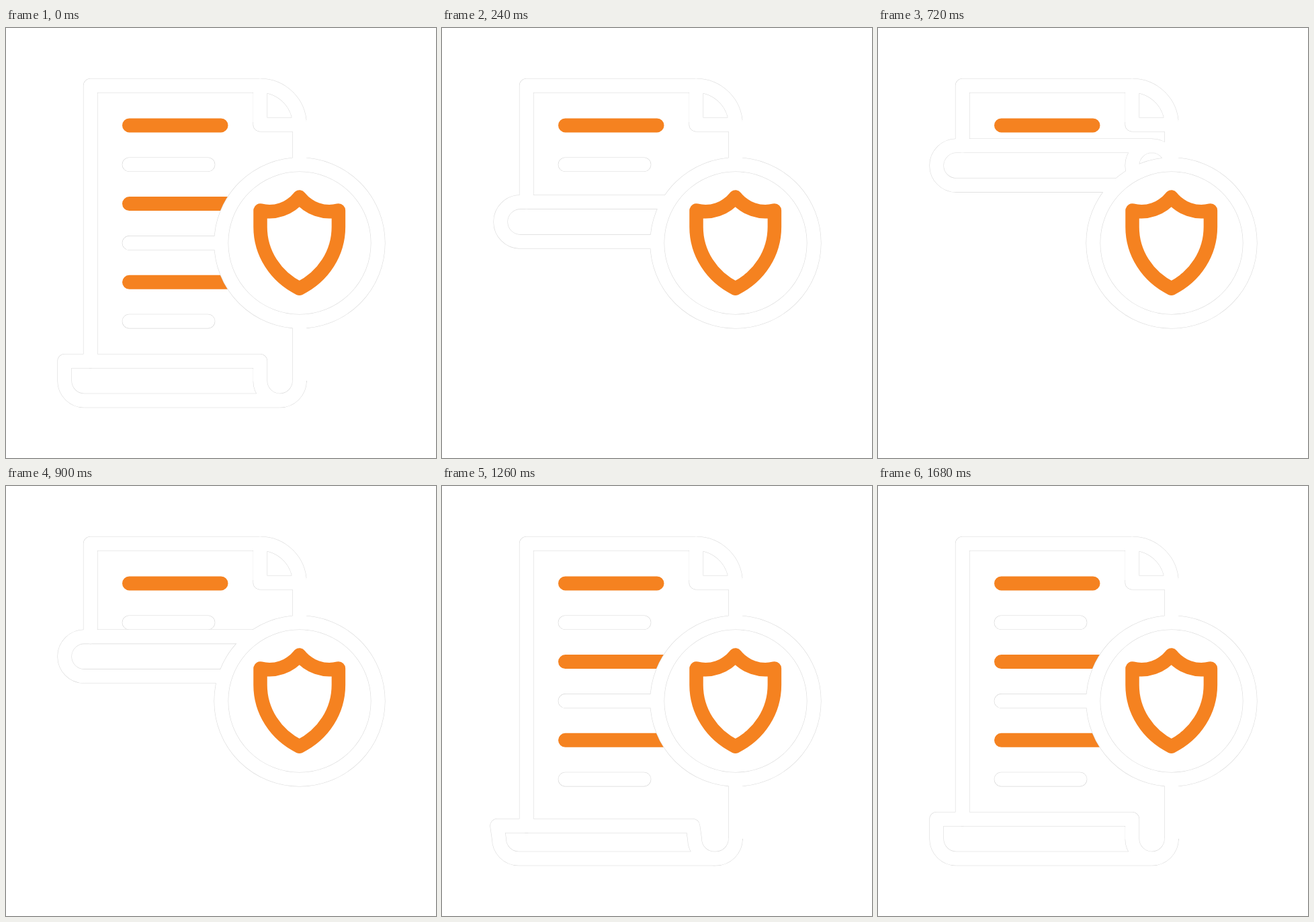
An HTML page that plays this animation: 640 px wide and 640 px high, repeating every 1.71 s.

```html
<!DOCTYPE html>
<html lang="en">
<head>
<meta charset="utf-8">
<title>Protected scroll</title>
<style>
  html, body { margin: 0; width: 100%; height: 100%; overflow: hidden; background: #fff; }
  svg { display: block; width: 100vw; height: 100vh; }
  path, circle { fill: none; stroke-linecap: round; stroke-linejoin: round; }
  .edge { stroke: #d8d8d8; stroke-width: 21.6; }
  .white { stroke: #fff; stroke-width: 20.5; }
  .orange { stroke: #f58220; stroke-width: 21; }
</style>
</head>
<body>
<svg viewBox="0 0 640 640">
  <defs>
    <clipPath id="above"><rect id="aboveRect" width="640" height="480"/></clipPath>
    <clipPath id="outside">
      <path clip-rule="evenodd" d="M0 0H640V640H0Z M317 320a120 120 0 1 0 240 0a120 120 0 1 0 -240 0Z"/>
    </clipPath>
    <g id="paper">
      <path class="sheet"/>
      <path d="M378.3 85.7A58.6 58.6 0 0 1 436.9 143.7H378.3Z"/>
      <path class="roll"/>
      <path clip-path="url(#above)" d="M183.5 203.2H300.5M183.5 319.9H330M183.5 436.6H300.5"/>
    </g>
  </defs>
  <use href="#paper" class="edge"/>
  <path id="hidden" stroke="#fff" stroke-width="1.6" style="stroke-linecap:butt"/>
  <path id="flapHidden" stroke="#fff" stroke-width="1.6" d="M368.2 508V525"/>
  <path class="orange" clip-path="url(#above)" d="M183.5 144.9H320M183.5 261.6H345M183.5 378.3H345"/>
  <circle cx="437" cy="320" r="127" style="fill:#fff"/>
  <circle class="edge" cx="437" cy="320" r="116.7"/>
  <circle class="white" cx="437" cy="320" r="116.7"/>
  <g clip-path="url(#outside)"><use href="#paper" class="white"/></g>
  <path class="orange" style="stroke-width:20.5" d="M436.7 251.5C423 269 400 277 378.5 271.5V296C378.5 335 401 370 436.7 387.7C472.4 370 494.9 335 494.9 296V271.5C473.4 277 450.4 269 436.7 251.5Z"/>
</svg>
<script>
const LOOP = 1710, STEP = 30, RADIUS = 29.4, LIFT = 325.5;
const $ = s => document.querySelector(s);
const clamp = x => Math.min(1, Math.max(0, x));
const smooth = x => (x = clamp(x), x * x * (3 - 2 * x));

const lift = t => t < 570
  ? LIFT * (1 - (1 - t / 570) ** 2.375)
  : LIFT * (1 - clamp((t - 570) / 600) ** 3);

const curl = t => t < 600 ? smooth(t / 150) : 1 - smooth((t - 1050) / 120);

// sideways swing of the flap after it drops open
const lean = t => t < 1140
  ? 10 * Math.sin(clamp((t - 1050) / 90) * Math.PI / 2)
  : 10 * (1 - clamp((t - 1140) / 500)) ** 2.5;

function render(t) {
  const up = lift(t), m = curl(t), swing = lean(t);
  const top = 495.7 - up + 2 * swing * (1 - m);
  const mid = 525.1 - up, bottom = 554.5 - up;
  const r = RADIUS * m, shoulder = Math.min(top + r, mid);
  const left = 87.2 - swing, right = 378.3 - swing;
  const footL = 87.2 - swing * .45, footR = 378.3 - swing * .45;
  const arc = (rad, x, y) => `A${rad} ${rad} 0 0 0 ${x} ${y}`;

  let roll = `M125.7 ${top}H${left + r}${arc(r, left, shoulder)}L${footL} ${mid}`
    + `${arc(RADIUS, footL + RADIUS, bottom)}H407.5${arc(RADIUS, 436.9, mid)}`
    + `M125.7 ${top}H${right + r}${arc(r, right, shoulder)}L${footR} ${mid}`
    + arc(RADIUS, 407.5, bottom);
  if (m > .7) roll += `M407.5 ${top}A${RADIUS} ${RADIUS} 0 0 1 436.9 ${mid}`;

  $('.roll').setAttribute('d', roll);
  $('.sheet').setAttribute('d', `M125.7 ${top}V85.7H378.3M436.9 143.7V${mid}`);
  $('#aboveRect').setAttribute('height', top);
  $('#hidden').setAttribute('d', `M447.8 137V${mid}M368.2 97V140`);
  $('#flapHidden').style.display = m < .1 && swing < 1 ? '' : 'none';
}

const start = performance.now();
function tick() {
  const t = (performance.now() - start) % LOOP;
  render(Math.floor(t / STEP) * STEP);
  requestAnimationFrame(tick);
}
tick();
</script>
</body>
</html>
```
